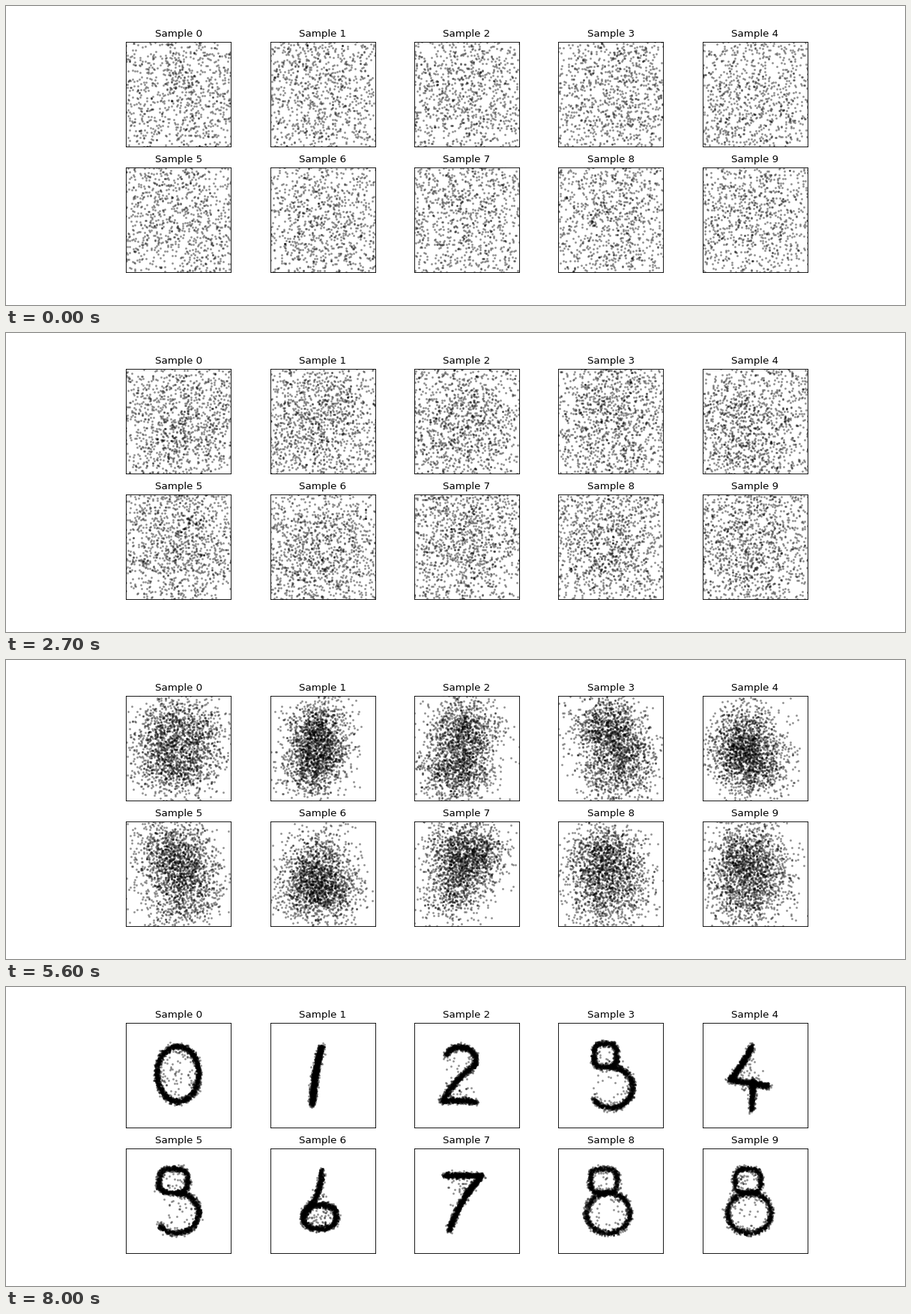
These frames come from a looping animation (1200 by 400 pixels, 8.1 s). A matplotlib script:

```python
import numpy as np
import matplotlib.pyplot as plt
from matplotlib.animation import FuncAnimation

FRAMES = 81
COUNT = 2000
SIDE = 140          # panel size in pixels
STRAY = 0.07        # share of points lying between strokes
PEN = 0.028         # softness of the finished strokes

rng = np.random.default_rng(7)
u = np.linspace(0, 1, 120)


# Stroke shapes in panel pixels, y downwards.
def bow(p, q, bend=0):
    """Line from p to q, bulging sideways by bend pixels."""
    p, q = np.array(p, float), np.array(q, float)
    side = np.array([p[1] - q[1], q[0] - p[0]]) / np.hypot(*(q - p))
    return p + u[:, None] * (q - p) + bend * np.sin(np.pi * u)[:, None] * side


def arc(cx, cy, rx, ry, start=0, sweep=360, power=1.0):
    """Ellipse arc in degrees; a power below 1 makes it boxy."""
    a = np.radians(start + sweep * u)
    c, s = np.cos(a), np.sin(a)
    return np.c_[cx + rx * np.sign(c) * abs(c) ** power,
                 cy + ry * np.sign(s) * abs(s) ** power]


def double_bowl(top, half, low, sweep):
    """Boxy loop above a wide bowl."""
    return [arc(top, 43, half, 16, power=0.6),
            arc(low, 86, 29, 27, start=-90, sweep=sweep)]


digits = [
    [arc(69, 68, 28, 37)],
    [bow((68, 31), (56, 109), 2)],
    [arc(61, 50, 21, 18, start=-160, sweep=180),
     bow((81, 56), (37, 105), 4), bow((37, 105), (83, 106), -2)],
    double_bowl(62, 15, 70, 235),
    [bow((66, 30), (36, 76), -2), bow((36, 76), (88, 84)),
     bow((67, 76), (65, 117))],
    double_bowl(63, 19, 68, 235),
    [bow((69, 28), (44, 90), -6), arc(66, 91, 22, 16, power=0.8)],
    [bow((40, 36), (90, 36)), bow((90, 36), (46, 110), 5)],
    double_bowl(60, 18, 66, 360),
    double_bowl(60, 17, 62, 360),
]


def pick(strokes):
    """Random points spread evenly along the strokes of one digit."""
    steps = np.concatenate([np.diff(s, axis=0) for s in strokes])
    starts = np.concatenate([s[:-1] for s in strokes])
    length = np.hypot(*steps.T)
    k = rng.choice(len(steps), COUNT, p=length / length.sum())
    return starts[k] + steps[k] * rng.uniform(size=(COUNT, 1))


def digit_cloud(strokes):
    pts, other = pick(strokes), pick(strokes)
    mix = rng.uniform(size=(COUNT, 1)) * (rng.uniform(size=(COUNT, 1)) < STRAY)
    return ((pts + (other - pts) * mix) / (SIDE / 2) - 1) * [1, -1]


# Reverse diffusion: shrink the noise a little, then stir it, every step.
time = np.linspace(0, 1, FRAMES)
sigma = np.hypot(abs(np.cos(time * np.pi / 2)) ** 1.55, PEN)

goal = np.array([digit_cloud(d) for d in digits])
noise = sigma[0] * rng.normal(size=goal.shape)
clouds = [goal + noise]
for s0, s1 in zip(sigma, sigma[1:]):
    ratio = (s1 / s0) ** 2
    noise = ratio * noise + s1 * np.sqrt(1 - ratio) * rng.normal(size=goal.shape)
    clouds.append(goal + noise)

fig, axes = plt.subplots(2, 5, figsize=(15, 5), dpi=80)
dots = []
for d, ax in enumerate(axes.flat):
    ax.set(xlim=(-1, 1), ylim=(-1, 1), xticks=[], yticks=[], aspect="equal")
    ax.set_title(f"Sample {d}", fontsize=12)
    dots.append(ax.scatter(*clouds[0][d].T, s=3, c="black", alpha=0.3))


def draw(i):
    for d, dot in enumerate(dots):
        dot.set_offsets(clouds[i][d])
    return dots


anim = FuncAnimation(fig, draw, frames=FRAMES, interval=100, repeat=True,
                     repeat_delay=0, blit=False)
plt.show()
```
